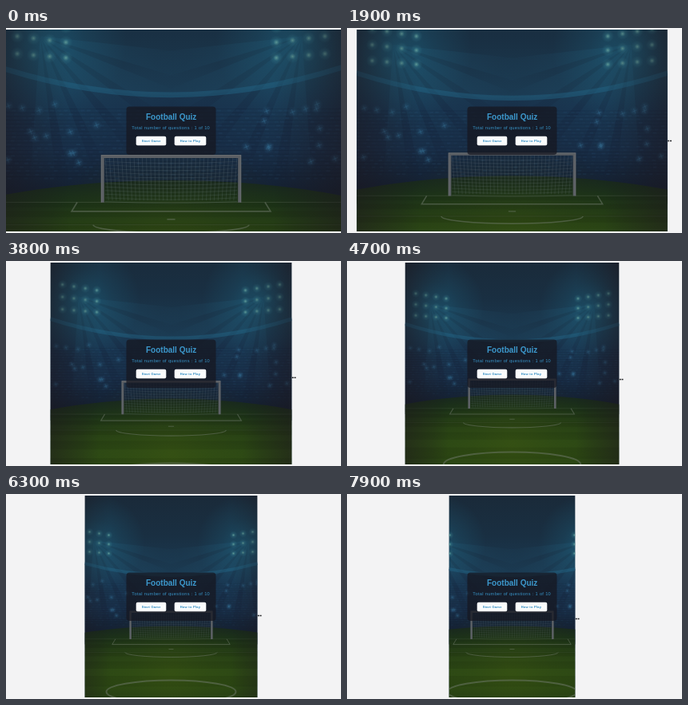
An HTML page with a canvas that plays this animation: 419 px wide and 257 px high, repeating every 8000 ms.

```html
<!DOCTYPE html>
<html lang="en">
<head>
<meta charset="utf-8">
<title>Football Quiz</title>
<style>
  html, body { margin: 0; width: 100%; height: 100%; overflow: hidden; background: #f3f3f4; }
  canvas { display: block; }
</style>
</head>
<body>
<canvas id="stage" width="419" height="257"></canvas>
<script>
const ctx = document.getElementById('stage').getContext('2d');
const LOOP = 8000, CENTER_X = 206.5, CENTER_Y = 128.5, TOP = 2, HEIGHT = 253;
const EDGE = 127; // half the side of the square stadium scene, slightly overdrawn

// [time, left edge] of the window while it is dragged narrower
const leftKeys = [[800, -7], [1900, 12.3], [2600, 33], [5400, 86], [7100, 110], [7900, 127.7]];

function interpolate(keys, t) {
  if (t <= keys[0][0]) return keys[0][1];
  const i = keys.findIndex(([time]) => t <= time);
  const [t0, v0] = keys[i - 1], [t1, v1] = keys[i];
  return v0 + (v1 - v0) * (t - t0) / (t1 - t0);
}

function seeded(seed) {
  return () => (seed = (seed * 16807) % 2147483647) / 2147483647;
}

function gradient(g, ...colors) {
  colors.forEach((color, i) => g.addColorStop(i / (colors.length - 1), color));
  return g;
}

function rect(color, x, y, w, h) {
  ctx.fillStyle = color;
  ctx.fillRect(x, y, w, h);
}

function roundRect(color, x, y, w, h, r) {
  ctx.fillStyle = color;
  ctx.beginPath();
  ctx.roundRect(x, y, w, h, r);
  ctx.fill();
}

function line(color, width, ...points) {
  ctx.strokeStyle = color;
  ctx.lineWidth = width;
  ctx.beginPath();
  points.forEach(([x, y]) => ctx.lineTo(x, y));
  ctx.stroke();
}

function arc(color, width, y, rx, ry, end) {
  ctx.strokeStyle = color;
  ctx.lineWidth = width;
  ctx.beginPath();
  ctx.ellipse(0, y, rx, ry, 0, 0, end);
  ctx.stroke();
}

function glow(x, y, r, rgb, alpha) {
  const fade = gradient(ctx.createRadialGradient(x, y, 0, x, y, r),
    `rgba(${rgb},${alpha})`, `rgba(${rgb},${alpha * 0.4})`, `rgba(${rgb},0)`);
  rect(fade, x - r, y - r, 2 * r, 2 * r);
}

function standArc() {
  ctx.beginPath();
  ctx.moveTo(-EDGE, -47);
  ctx.quadraticCurveTo(0, -6, EDGE, -47);
}

function drawSky() {
  rect(gradient(ctx.createLinearGradient(0, -EDGE, 0, -25), '#1a2a39', '#192f42', '#1b3b53'),
    -EDGE, -EDGE, 2 * EDGE, 2 * EDGE);
}

function drawStands() {
  standArc();
  ctx.lineTo(EDGE, 60);
  ctx.lineTo(-EDGE, 60);
  ctx.fillStyle = gradient(ctx.createLinearGradient(0, -45, 0, 45),
    '#1a364c', '#18304a', '#182c45', '#142031');
  ctx.fill();
  standArc();
  ctx.strokeStyle = 'rgba(32,84,114,.7)';
  ctx.lineWidth = 4;
  ctx.stroke();

  const random = seeded(91);
  for (let y = -16; y < 36; y += 2.8) {
    line('rgba(10,18,30,.22)', 0.4, [-EDGE, y], [EDGE, y]);
    for (let x = -EDGE; x < EDGE; x += 4 + random() * 5) {
      rect(`rgba(45,88,125,${random() * 0.16})`, x, y + 0.6, 3, 1.2);
    }
  }
  for (let i = 0; i < 26; i++) {
    const side = i % 2 ? 1 : -1;
    const x = side * (55 + random() * 68), y = -22 + random() * 46;
    glow(x, y, 4, '60,135,180', 0.28);
    line('rgba(75,145,185,.35)', 0.35, [x - 2, y + 0.8], [x + 2, y - 0.8]);
    line('rgba(75,145,185,.35)', 0.35, [x - 0.8, y - 2], [x + 0.8, y + 2]);
  }
}

function drawBeams(side) {
  const x = side * 97, y = -70;
  ctx.fillStyle = gradient(ctx.createRadialGradient(x, y, 0, x, y, 110),
    'rgba(40,115,150,.2)', 'rgba(40,115,150,.1)', 'rgba(40,115,150,0)');
  for (let i = 0; i < 6; i++) {
    const angle = 0.2 + i * 0.27;
    ctx.beginPath();
    ctx.moveTo(x, y);
    for (const spread of [-0.09, 0.09]) {
      ctx.lineTo(x - side * 110 * Math.cos(angle + spread), y + 110 * Math.sin(angle + spread));
    }
    ctx.fill();
  }
}

function drawLights() {
  for (const side of [-1, 1]) {
    drawBeams(side);
    glow(side * 95, -66, 62, '30,105,135', 0.58);
    for (let col = 0; col < 4; col++) for (let row = 0; row < 3; row++) {
      const x = side * (78 + 12 * col), y = -54 - col - row * (11.5 + 0.5 * col);
      glow(x, y, 5, '70,155,165', 0.45);
      glow(x, y, 2.2, '125,180,165', 0.6);
    }
  }
}

function drawField() {
  ctx.fillStyle = gradient(ctx.createLinearGradient(0, 36, 0, EDGE),
    '#17251f', '#1c3218', '#263f15', '#2c4815', '#2d4914', '#263f13');
  ctx.beginPath();
  ctx.ellipse(0, 127, 260, 90, 0, 0, 2 * Math.PI);
  ctx.fill();
  for (let y = 54, h = 3; y < EDGE; y += 2 * h, h *= 1.45) {
    rect('rgba(14,30,10,.14)', -EDGE, y, 2 * EDGE, h);
  }
  glow(0, 95, 95, '85,110,15', 0.2);

  const chalk = 'rgba(115,125,110,.5)';
  line('rgba(115,125,110,.25)', 0.6, [-EDGE, 53.3], [EDGE, 53.3]);
  line(chalk, 1, [-69.6, 53.3], [-73.7, 60.1], [73.7, 60.1], [69.6, 53.3]);
  line(chalk, 0.9, [-3, 66], [3, 66]);
  line('rgba(115,125,110,.18)', 0.6, [-EDGE, 70], [EDGE, 70]);
  arc(chalk, 1, 70, 57.7, 6, Math.PI);
  arc(chalk, 2, 119.5, 81, 14.5, 2 * Math.PI);
}

function drawShade() {
  const dark = 'rgba(28,22,28,.5)', clear = 'rgba(28,22,28,0)';
  for (const side of [-1, 1]) {
    const fade = gradient(ctx.createLinearGradient(side * EDGE, 0, side * 75, 0), dark, clear);
    rect(fade, side < 0 ? -EDGE : 75, -EDGE, EDGE - 75, 2 * EDGE);
  }
}

function drawGoal() {
  const net = 'rgba(135,150,160,.24)';
  for (let i = -16; i <= 16; i++) line(net, 0.4, [i * 3.05, 20], [i * 2.9, 52]);
  for (let y = 23; y < 53; y += 2.7) {
    line(net, 0.4, [-49, y], [-25, y + 1], [0, y + 1.4], [25, y + 1], [49, y]);
  }
  line('#5b5f64', 2.4, [-50.8, 53.4], [-50.8, 19.2], [50.8, 19.2], [50.8, 53.4]);
  line('rgba(130,133,136,.35)', 0.6, [-51.6, 53.4], [-51.6, 18.4], [51.6, 18.4], [51.6, 53.4]);
}

function drawStadium(left) {
  const width = 2 * (CENTER_X - left), scale = Math.max(width, HEIGHT) / HEIGHT;
  ctx.save();
  ctx.beginPath();
  ctx.rect(left, TOP, width, HEIGHT);
  ctx.clip();
  ctx.translate(CENTER_X, CENTER_Y);
  ctx.scale(scale, scale);
  drawSky();
  drawStands();
  drawLights();
  drawField();
  drawShade();
  drawGoal();
  ctx.restore();
}

function text(label, x, y, font, color, spacing = 0) {
  ctx.font = `${font} "Liberation Sans", Arial, sans-serif`;
  ctx.letterSpacing = spacing + 'px';
  ctx.fillStyle = color;
  ctx.fillText(label, x, y);
}

function drawButton(label, x, width) {
  roundRect('#fafcfd', x, 135.7, width, 11.6, 2);
  text(label, x + 7, 143, 'bold 4px', '#2a88c0', 0.26);
}

function drawPanel() {
  roundRect('rgba(22,24,33,.74)', 150.5, 98.5, 112, 60.5, 4);
  text('Football Quiz', 175, 115, 'bold 10px', '#3c98cc');
  text('Total number of questions : 1 of 10', 157.3, 127, '5.7px', '#3893c6', 0.3);
  drawButton('Start Game', 162.7, 37.6);
  drawButton('How to Play', 210.7, 39.6);
}

function drawCursor(right, t) {
  const y = 136.8 + 0.0025 * t;
  for (const dx of [0.5, 3.3]) rect('#15171a', right + dx, y - 0.8, 1.9, 1.5);
}

function frame(now) {
  const t = Math.floor(now % LOOP / 100) * 100;
  const left = interpolate(leftKeys, t);
  rect('#f3f3f4', 0, 0, 419, 257);
  drawStadium(left);
  drawPanel();
  if (t >= 900) drawCursor(2 * CENTER_X - left, t);
  requestAnimationFrame(frame);
}
requestAnimationFrame(frame);
</script>
</body>
</html>
```
